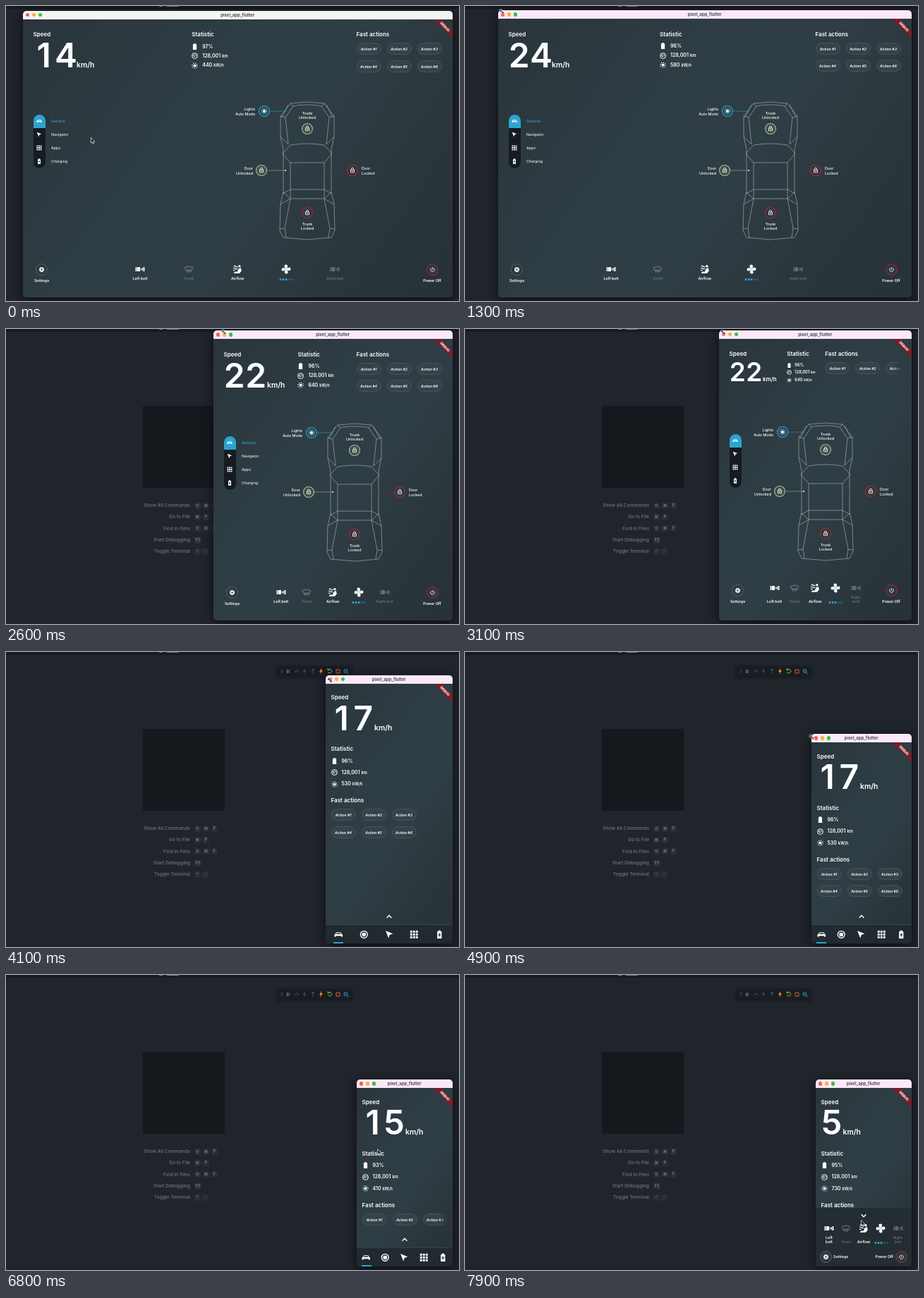
Write an HTML page that moves like this. It is 642 px wide and 418 px high and loops after 8000 ms.

```html
<!DOCTYPE html>
<html lang="en">
<head>
<meta charset="utf-8">
<title>Resizable dashboard</title>
<style>
@property --tens { syntax: "<integer>"; inherits: true; initial-value: 1; }
@property --units { syntax: "<integer>"; inherits: true; initial-value: 4; }
@property --charge { syntax: "<integer>"; inherits: true; initial-value: 97; }
@property --power { syntax: "<integer>"; inherits: true; initial-value: 440; }
@property --open { syntax: "<number>"; inherits: true; initial-value: 0; }
@counter-style lead { system: fixed 0; symbols: "" "1" "2"; }

html, body { margin: 0; width: 100%; height: 100%; overflow: hidden; background: #20242b; }
* { box-sizing: border-box; }
body { position: relative; font: 500 5.3px/6px Inter, sans-serif; color: #fff; }
h2 { margin: 0; font: 600 8px/10px Inter, sans-serif; white-space: nowrap; }
svg { display: block; fill: currentColor; overflow: visible; }
.line { fill: none; stroke: currentColor; stroke-width: 2; }

/* Editor behind the window */
.strip { position: absolute; inset: 0 0 auto; height: 4px; background: #181a1f; }
.strip::before { content: ""; position: absolute; left: 217px; width: 28px; height: 1px;
  background: linear-gradient(90deg, #777 5px, transparent 5px 11px, #777 11px); }
.mark { position: absolute; left: 194px; top: 109px; width: 116px; height: 116px; background: #15181d; }
.hints { position: absolute; left: 0; top: 242px; width: 320px; font-size: 6.7px; color: #70767e; }
.hints div { display: flex; align-items: center; height: 16.3px; gap: 2.6px; }
.hints span { width: 261px; margin-right: 3px; text-align: right; }
kbd { min-width: 9px; height: 9px; padding: 0 2px; border-radius: 2px; background: #2a2f36; color: #9298a0;
  font: 5.5px/9px Inter, "DejaVu Sans", sans-serif; text-align: center; }
.debugbar { position: absolute; left: 385px; top: 20px; width: 105px; height: 15px; background: #191c21; box-shadow: 0 1px 4px #0007; }

/* Window */
.win, .shadow { position: absolute; left: 24px; top: 6.5px; right: 9.5px; bottom: 5px; border-radius: 5px; }
.win { container-type: size; overflow: hidden;
  background: linear-gradient(125deg, #29353b, #2e3c43 35%, #2f3d44 58%, #2a363c 80%, #263238);
  animation: resize 8s infinite, values 8s step-end infinite, sheet 8s infinite; }
.shadow { box-shadow: 0 4px 16px #0009; animation: resize 8s infinite; }
.bar { position: absolute; inset: 0 0 auto; height: 12.3px; background: #f4f4f5; color: #403c42;
  font: 600 6px/12px Inter, sans-serif; text-align: center; animation: tint 8s step-end infinite; }
.bar i { position: absolute; top: 3.2px; width: 5.6px; height: 5.6px; border-radius: 50%; }
.debug { position: absolute; right: -11px; top: 19.5px; width: 44px; height: 7px; background: #7f1d28;
  font: 800 4.9px/7px Inter, sans-serif; text-align: center; transform: rotate(45deg); }
.speed, .stat, .fast, .menu, .car { position: absolute; }

.speed { left: 14.5px; top: 28.5px; }
.num { margin-top: 1px; font: 600 48px/1 Inter, sans-serif; white-space: nowrap; }
.num i { display: inline-block; width: .636em; font-style: normal; text-align: center; }
.tens { max-width: calc(var(--tens) * 1em); }
.tens::before { counter-reset: n var(--tens); content: counter(n, lead); }
.units::before { counter-reset: n var(--units); content: counter(n); }
.num span { margin-left: .5px; font-size: .215em; }

.stat { left: calc(44.36cqw - 30.7px); top: 28.5px; --pitch: 13.5px; --icon: 9px; --gap: 6px; --gap0: 5.25px; font: 600 7px/1 Inter, sans-serif; }
.stat h2 { margin-bottom: var(--gap0); }
.stat div { display: flex; align-items: center; height: var(--pitch); white-space: pre; }
.stat svg { width: var(--icon); height: var(--icon); margin-right: var(--gap); }
.stat small { margin-left: .06em; font-size: .8em; }
.charge::before { counter-reset: n var(--charge); content: counter(n); }
.power::before { counter-reset: n var(--power); content: counter(n); }

.fast { left: calc(100cqw - 136px); top: 28.5px; }
.pills { display: flex; flex-wrap: wrap; gap: 7.5px 8px; width: 122px; margin-top: 7.25px; }
.pills span { flex: 0 0 35px; height: 17px; border: .6px solid #465359; border-radius: 9px; background: #364249;
  font: italic 600 5.1px/16px Inter, sans-serif; text-align: center; }

.menu { left: 14.5px; top: calc(50cqh - 18px - 38px); width: 17.5px; height: 76px; border-radius: 9px;
  background: linear-gradient(#2ba5cf 19px, #151c21 19px); }
.menu div { position: relative; height: 19px; }
.menu svg { position: absolute; left: 4.75px; top: 5.5px; width: 8px; height: 8px; }
.menu span { position: absolute; left: 25.5px; top: 6.5px; color: #e4e9ea; }
.menu div:first-child span { color: #2ba5cf; }

.car { left: calc(75.15cqw - 54px); top: calc(50cqh + 23px); width: 1px; height: 1px; }
.body { fill: none; stroke: #dbe4e4; stroke-width: .6; opacity: .75; }
.car text { text-anchor: middle; }
.car .end text { text-anchor: end; }
.car .start text { text-anchor: start; }

/* Bottom controls */
.sheet { display: contents; }
.chev, .nav { display: none; }
.tool { position: absolute; bottom: 0; width: 0; left: calc(50cqw + var(--i) * var(--sp)); opacity: var(--o, 1);
  --sp: calc(11.98cqw - 3.8px); --iy: 33px; --ly: 24.5px; --lw: 40px; font-weight: 600; }
.tool svg { position: absolute; left: -7px; bottom: var(--iy); width: 14px; height: 14px; }
.tool span { position: absolute; left: calc(var(--lw) / -2); bottom: var(--ly); width: var(--lw); text-align: center; }
.tool.off { --o: .28; }
.tool .ring { left: -8.5px; width: 17px; height: 17px; padding: 3.5px; border: .8px solid #55636a; border-radius: 50%; background: #2d393f; }
.tool .red { padding: 4px; border: 1.3px solid #b8202d; }
.set, .pow { --iy: 31.5px; --ly: 21.5px; }
.set { left: 26.5px; }
.pow { left: calc(100cqw - 28.5px); }
.dots { display: block; height: 3px; background: radial-gradient(circle at 2px 1.5px, #2ba5cf 1.3px, transparent 1.7px) 0 0 / 4.1px 3px;
  -webkit-mask: linear-gradient(90deg, #000 12.3px, #0005 12.3px); mask: linear-gradient(90deg, #000 12.3px, #0005 12.3px); width: 20.5px; margin: auto; }

@container (max-width: 330px) {
  .num { margin-top: 2px; font-size: 37px; }
  .stat { left: calc(96px + 50cqw - 136px); --pitch: 10.5px; --icon: 7px; --gap: 4px; --gap0: 5.75px; font-size: 5.7px; }
  .fast { left: calc(150px + 60cqw - 163.2px); right: 15px; }
  .pills { flex-wrap: nowrap; width: auto; overflow: hidden; -webkit-mask: linear-gradient(270deg, transparent, #000 12px); mask: linear-gradient(270deg, transparent, #000 12px); }
  .menu { top: calc(50cqh - 20.5px - 38px); }
  .menu span { display: none; }
  .tool { --iy: 39px; --lw: 22px; }
  .set, .pow { --iy: 34.5px; --ly: 24.5px; --lw: 40px; }
}
@container (max-width: 257px) {
  .menu, .car { display: none; }
  .speed { left: 7.5px; top: 26.5px; }
  .num { margin-top: .5px; font-size: 48px; }
  .stat { left: 7.5px; top: 99.5px; --pitch: 16.5px; --icon: 9px; --gap: 6px; --gap0: 3.75px; font-size: 7px; }
  .fast { left: 7.5px; right: auto; top: 172.5px; }
  .pills { flex-wrap: wrap; width: 122px; margin-top: 7px; -webkit-mask: none; mask: none; }
  .sheet { display: block; position: absolute; inset: auto 0 0; height: calc(49px + 34px * var(--open)); overflow: hidden;
    background: rgb(35 45 50 / var(--open)); }
  .chev { display: block; position: absolute; left: calc(50cqw - 5px); top: 6px; width: 10px; height: 10px; transform: rotate(calc(var(--open) * 180deg)); }
  .nav { display: flex; position: absolute; inset: auto 0 0; height: 27px; opacity: calc(1 - var(--open)); background: #202a2f; border-top: .6px solid #34424a; }
  .nav div { flex: 1; display: grid; place-items: center; }
  .nav div:first-child { background: linear-gradient(#2ba5cf 0 0) center bottom / 14px 2px no-repeat; }
  .nav svg { width: 12.5px; height: 12.5px; }
  .tool { opacity: calc(var(--open) * var(--o, 1)); --sp: 18cqw; --iy: 47px; --ly: 32px; --lw: 18px; }
  .set, .pow { --iy: 5.5px; --ly: 11px; }
  .set { left: 14px; }
  .pow { left: calc(100cqw - 14.5px); }
  .set span, .pow span { width: auto; white-space: nowrap; }
  .set span { left: 11px; }
  .pow span { left: auto; right: 11px; }
}
@container (max-width: 137px) {
  .fast { right: 7px; }
  .pills { flex-wrap: nowrap; width: auto; -webkit-mask: linear-gradient(270deg, transparent, #000 12px); mask: linear-gradient(270deg, transparent, #000 12px); }
}

/* Pointer */
.pointer { position: absolute; left: 0; top: 0; width: 0; height: 0; animation: point 8s infinite; }
.pointer svg { position: absolute; fill: #08090a; stroke: #fff; stroke-width: .7; }
.arrow { width: 7px; height: 10px; animation: arrow 8s step-end infinite; }
.grip { left: -4px; top: -4px; width: 8px; height: 8px; opacity: 0; animation: grip 8s step-end infinite; }

@keyframes resize {
  0% { left: 24px; top: 6.5px; }
  12.5% { left: 24px; top: 6.5px; animation-timing-function: steps(3); }
  16.25% { left: 47px; top: 6px; animation-timing-function: steps(8); }
  26.25% { left: 228px; top: 2.5px; animation-timing-function: steps(10); }
  38.75% { left: 360px; top: 1.5px; animation-timing-function: steps(5); }
  45% { left: 425px; top: 5px; animation-timing-function: steps(5); }
  51.25% { left: 453px; top: 32.5px; animation-timing-function: steps(5); }
  57.5% { left: 479px; top: 92px; animation-timing-function: steps(6); }
  65% { left: 503px; top: 140px; animation-timing-function: steps(6); }
  72.5% { left: 506px; top: 144.5px; animation-timing-function: steps(5); }
  78.75%, 100% { left: 497px; top: 148px; }
}
@keyframes values {
  0% { --tens: 1; --units: 4; --charge: 97; --power: 440; }
  6.25% { --tens: 2; --units: 4; --charge: 96; --power: 580; }
  27.5% { --tens: 2; --units: 2; --charge: 96; --power: 640; }
  46.25% { --tens: 1; --units: 7; --charge: 96; --power: 530; }
  66.25% { --tens: 1; --units: 5; --charge: 93; --power: 410; }
  87.5%, 100% { --tens: 0; --units: 5; --charge: 95; --power: 730; }
}
@keyframes sheet {
  0% { --open: 0; }
  91.25% { --open: 0; animation-timing-function: steps(3); }
  95%, 100% { --open: 1; }
}
@keyframes tint {
  0% { background: #f4f4f5; }
  13.75%, 100% { background: #fbe9fa; }
}
@keyframes point {
  0% { translate: 120px 186px; animation-timing-function: steps(7); }
  8.75% { translate: 25px 8px; }
  12.5% { translate: 25px 8px; animation-timing-function: steps(3); }
  16.25% { translate: 52px 8px; animation-timing-function: steps(8); }
  26.25% { translate: 251px 4px; animation-timing-function: steps(10); }
  38.75% { translate: 366px 5px; animation-timing-function: steps(5); }
  45% { translate: 431px 12px; animation-timing-function: steps(5); }
  51.25% { translate: 459px 40px; animation-timing-function: steps(5); }
  57.5% { translate: 482px 97px; animation-timing-function: steps(6); }
  65% { translate: 501px 144px; animation-timing-function: steps(6); }
  72.5% { translate: 503px 148px; animation-timing-function: steps(5); }
  78.75% { translate: 497px 149px; }
  81.25% { translate: 497px 149px; animation-timing-function: steps(7); }
  90% { translate: 565px 376px; animation-timing-function: steps(3); }
  93.75%, 100% { translate: 561px 347px; }
}
@keyframes arrow { 0% { opacity: 1; } 8.75% { opacity: 0; } 81.25%, 100% { opacity: 1; } }
@keyframes grip { 0% { opacity: 0; } 8.75% { opacity: 1; } 81.25%, 100% { opacity: 0; } }
</style>
</head>
<body>
<svg width="0" height="0" style="position:absolute">
  <symbol id="car" viewBox="0 0 24 24"><path fill-rule="evenodd" d="M6 6h12l3 5 2 1v6h-4v-2H5v2H1v-6l2-1zM7 8l-2 3h14l-2-3z"/></symbol>
  <symbol id="go" viewBox="0 0 24 24"><path d="M2 2l8 20 3-9 9-3z"/></symbol>
  <symbol id="grid" viewBox="0 0 24 24"><path class="line" style="stroke-width:5.6;stroke-dasharray:5.6 2.1" d="M1.5 4.3h21M1.5 12h21M1.5 19.7h21"/></symbol>
  <symbol id="bolt" viewBox="0 0 24 24"><path fill-rule="evenodd" d="M9 1h6v3h3v19H6V4h3zm4 6l-5 7h3v5l5-7h-3z"/></symbol>
  <symbol id="cell" viewBox="0 0 24 24"><path d="M9 0h6v3h4v21H5V3h4z"/></symbol>
  <symbol id="gauge" viewBox="0 0 24 24"><circle class="line" cx="12" cy="12" r="10.5" style="stroke-width:2.6"/><path class="line" d="M5 14a7 7 0 0 1 14 0"/><path d="M10 17l-3-8 7 5z"/></symbol>
  <symbol id="sun" viewBox="0 0 24 24"><circle cx="12" cy="12" r="5.5"/><circle class="line" cx="12" cy="12" r="9.5" style="stroke-width:4;stroke-dasharray:2.6 4.86"/></symbol>
  <symbol id="gear" viewBox="0 0 24 24"><circle class="line" cx="12" cy="12" r="6" style="stroke-width:4.5"/><circle class="line" cx="12" cy="12" r="9.5" style="stroke-width:4;stroke-dasharray:4.2 3.26"/></symbol>
  <symbol id="lock" viewBox="0 0 24 24"><path class="line" style="stroke-width:2.6" d="M4.5 10h15v12h-15zM7.5 10V6.5a4.5 4.5 0 0 1 9 0V10"/><circle cx="12" cy="16" r="2.4"/></symbol>
  <symbol id="dot" viewBox="0 0 24 24"><circle class="line" cx="12" cy="12" r="9.5" style="stroke-width:2.6"/><circle cx="12" cy="12" r="5.5"/></symbol>
  <symbol id="belt" viewBox="0 0 24 24"><path d="M1 7h3v10H1zM5 7h7v10H5zM13.5 10h2v4h-2zM16 12l3-5v10zM20 7h3v10h-3z"/></symbol>
  <symbol id="glass" viewBox="0 0 24 24"><path class="line" d="M2 9q10-7 20 0l-4 7H6zM8 12v8M12 11v9M16 12v8"/></symbol>
  <symbol id="air" viewBox="0 0 24 24"><circle cx="17" cy="4.5" r="2.8"/><path d="M14 11l6-3 2 8-5 6H3l2-4h7z"/><path class="line" d="M3 5q3-3 5 0t5 0M2 10q3-3 5 0t5 0M2 15q2-2 4 0"/></symbol>
  <symbol id="fan" viewBox="0 0 24 24"><path id="petal" d="M12 12C7 9 6 1 11 1c6 0 6 6 1 11z"/><use href="#petal" transform="rotate(90 12 12)"/><use href="#petal" transform="rotate(180 12 12)"/><use href="#petal" transform="rotate(270 12 12)"/></symbol>
  <symbol id="power" viewBox="0 0 24 24"><path class="line" style="stroke-width:3" d="M12 1v11M6 4.5a9.5 9.5 0 1 0 12 0"/></symbol>
  <symbol id="up" viewBox="0 0 24 24"><path class="line" style="stroke-width:3.5" d="M4 16l8-8 8 8"/></symbol>
</svg>

<div class="strip"></div>
<div class="mark"></div>
<div class="hints">
  <div><span>Show All Commands</span> <kbd>⇧</kbd> <kbd>⌘</kbd> <kbd>P</kbd></div>
  <div><span>Go to File</span> <kbd>⌘</kbd> <kbd>P</kbd></div>
  <div><span>Find in Files</span> <kbd>⇧</kbd> <kbd>⌘</kbd> <kbd>F</kbd></div>
  <div><span>Start Debugging</span> <kbd>F5</kbd></div>
  <div><span>Toggle Terminal</span> <kbd>^</kbd> <kbd>`</kbd></div>
</div>
<svg class="debugbar" viewBox="0 0 105 15" fill="none" stroke-width="1">
  <path stroke="#555b63" stroke-dasharray="1" d="M5 5v6M7 5v6"/>
  <path stroke="#6b9cc0" d="M13.5 5v5M16 5v5"/>
  <path stroke="#4d5962" fill="none" d="M24 9q3-6 6 0M27 11v.5M38 4v5M36 7l2 2 2-2M38 11v.5"/>
  <path stroke="#2f6487" fill="none" d="M50 10V4M48 6l2-2 2 2M50 11v.5"/>
  <path fill="#f08a24" d="M62 3l-3 5h2l-1 4 4-6h-2z"/>
  <path stroke="#7fb55a" fill="none" d="M72 5a2.8 2.8 0 1 1-.8 3M71 3v2.5h2.5"/>
  <path stroke="#d9603a" fill="none" d="M83 5h5v5h-5z"/>
  <path stroke="#2f9bd0" fill="none" d="M99 7a2.5 2.5 0 1 1-5 0 2.5 2.5 0 0 1 5 0zM98.5 9l2.5 2.5M95.5 7h2"/>
</svg>

<div class="shadow"></div>
<main class="win">
  <section class="speed"><h2>Speed</h2><div class="num"><i class="tens"></i><i class="units"></i><span>km/h</span></div></section>
  <section class="stat">
    <h2>Statistic</h2>
    <div><svg><use href="#cell"/></svg><span class="charge">%</span></div>
    <div><svg><use href="#gauge"/></svg><span>128,001 <small>km</small></span></div>
    <div><svg><use href="#sun"/></svg><span class="power"> <small>kW/h</small></span></div>
  </section>
  <section class="fast">
    <h2>Fast actions</h2>
    <div class="pills"><span>Action #1</span><span>Action #2</span><span>Action #3</span><span>Action #4</span><span>Action #5</span><span>Action #6</span></div>
  </section>
  <nav class="menu">
    <div><svg><use href="#car"/></svg><span>General</span></div>
    <div><svg><use href="#go"/></svg><span>Navigator</span></div>
    <div><svg><use href="#grid"/></svg><span>Apps</span></div>
    <div><svg><use href="#bolt"/></svg><span>Charging</span></div>
  </nav>

  <svg class="car" viewBox="0 0 1 1">
    <g class="body">
      <path id="half" d="M0-97L-24-95-38-77-38-48-34-30V30L-38 48-39 85-34 95 0 98M0-93Q-14-93-20-91L-31-75-27-37M-24-95l4 4M-38-77l7 2M-27-93l-9 18M-38-48l11 11M-35-24l11-12Q-12-38 0-38M-35-24l11 13H0M-24-11V27H0M-24 27l-11 6M-34 31l10 9H0M-24 27v13M-38 48l14-8-8 42 2 13M-39 83l7-1"/>
      <use href="#half" transform="scale(-1 1)"/>
    </g>
    <g fill="none" stroke-width=".7">
      <path stroke="#2b8fb2" d="M-53-84h23"/>
      <path stroke="#8d9c94" d="M-57 0h26"/>
      <path stroke="#6b2b33" d="M31 0h25"/>
    </g>
    <circle cx="-31" r="1"/><circle cx="30" r="1" fill="#8f2630"/>
    <g fill="#2c3a40" stroke-width="1.1">
      <circle cx="-61" cy="-84" r="7.5" stroke="#2ba5cf" fill="#23475a"/>
      <circle cy="-59" r="7.5" stroke="#a3bd9f" fill="#435149"/>
      <circle cx="-65" r="7.5" stroke="#a3bd9f" fill="#435149"/>
      <circle cx="64" r="7.5" stroke="#b8202d"/>
      <circle cy="60" r="7.5" stroke="#b8202d"/>
    </g>
    <use href="#sun" x="-65.5" y="-88.5" width="9" height="9"/>
    <use href="#lock" x="-4" y="-63.5" width="8" height="8"/>
    <use href="#lock" x="-69" y="-4.5" width="8" height="8"/>
    <use href="#lock" x="60" y="-4.5" width="8" height="8"/>
    <use href="#lock" x="-4" y="55.5" width="8" height="8"/>
    <text y="-79.5">Trunk</text><text y="-73.3">Unlocked</text>
    <text y="78">Trunk</text><text y="84.3">Locked</text>
    <g class="end">
      <text x="-74" y="-85">Lights</text><text x="-74" y="-78.5">Auto Mode</text>
      <text x="-77" y="-1">Door</text><text x="-77" y="5.5">Unlocked</text>
    </g>
    <g class="start"><text x="77" y="-1">Door</text><text x="77" y="5.5">Locked</text></g>
  </svg>

  <section class="sheet">
    <svg class="chev"><use href="#up"/></svg>
    <div class="tool set"><svg class="ring" viewBox="0 0 24 24"><use href="#gear"/></svg><span>Settings</span></div>
    <div class="tool" style="--i:-2"><svg><use href="#belt"/></svg><span>Left belt</span></div>
    <div class="tool off" style="--i:-1"><svg><use href="#glass"/></svg><span>Front</span></div>
    <div class="tool" style="--i:0"><svg><use href="#air"/></svg><span>Airflow</span></div>
    <div class="tool" style="--i:1"><svg><use href="#fan"/></svg><span><i class="dots"></i></span></div>
    <div class="tool off" style="--i:2"><svg><use href="#belt"/></svg><span>Right belt</span></div>
    <div class="tool pow"><svg class="ring red" viewBox="0 0 24 24"><use href="#power"/></svg><span>Power Off</span></div>
    <div class="nav">
      <div><svg><use href="#car"/></svg></div>
      <div><svg><use href="#dot"/></svg></div>
      <div><svg><use href="#go"/></svg></div>
      <div><svg><use href="#grid"/></svg></div>
      <div><svg><use href="#bolt"/></svg></div>
    </div>
  </section>
  <div class="debug">DEBUG</div>
  <header class="bar">
    <i style="left:3.7px;background:#ff5a52"></i><i style="left:12.7px;background:#f6b52c"></i><i style="left:21.7px;background:#35c148"></i>
    pixel_app_flutter
  </header>
</main>

<div class="pointer">
  <svg class="arrow" viewBox="0 0 7 10"><path d="M.5.5v7.5l1.7-1.5 1.3 2.8 1.2-.6-1.2-2.6h2.2z"/></svg>
  <svg class="grip" viewBox="0 0 8 8"><path d="M1 1h3.5L3.3 2.2l2.5 2.5L7 3.5V7H3.5l1.2-1.2-2.5-2.5L1 4.5z"/></svg>
</div>
</body>
</html>
```
